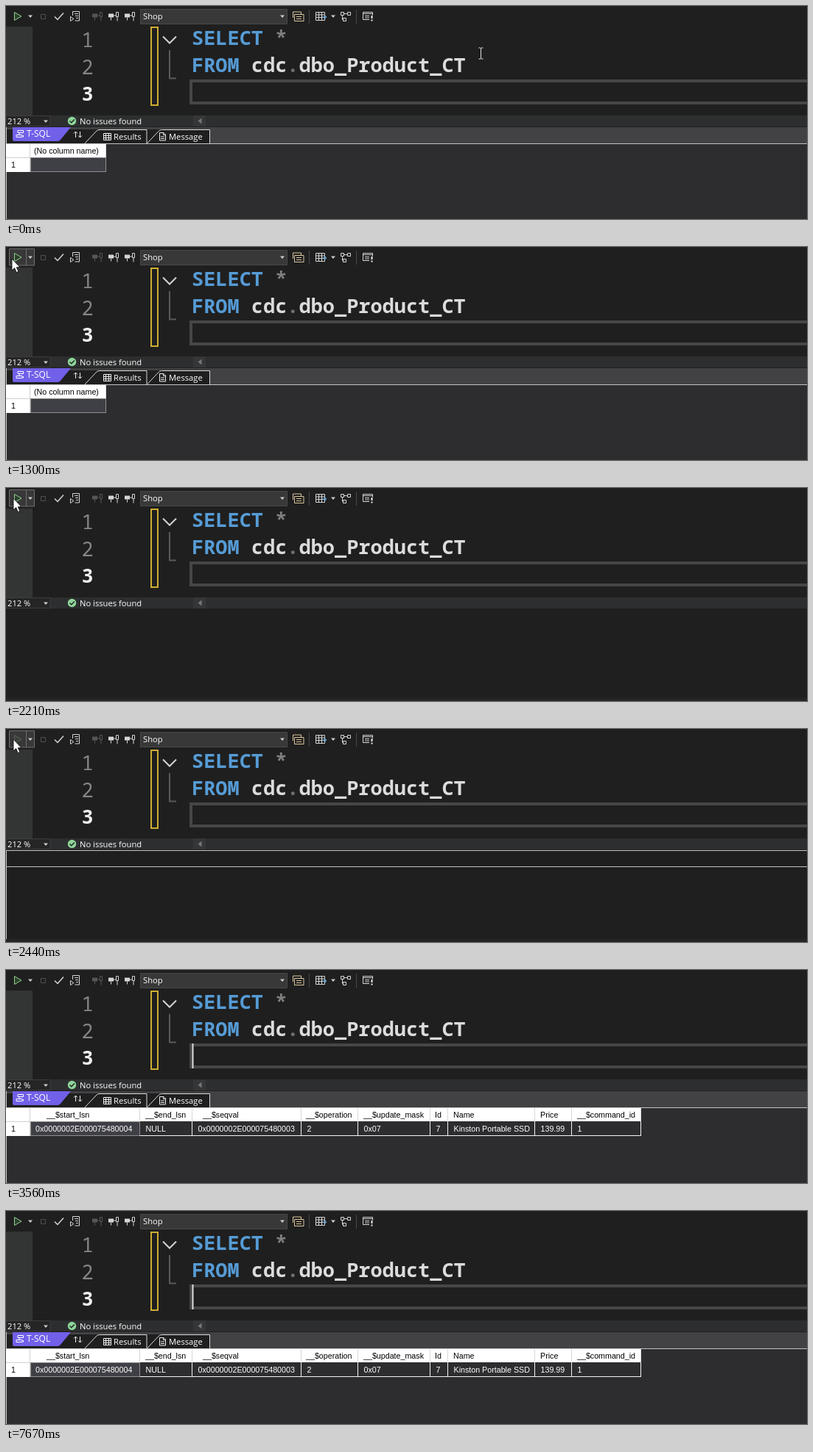
These frames come from a looping animation (1087x290 px, 7940 ms). An HTML page:

```html
<!DOCTYPE html>
<html lang="en">
<head>
<meta charset="utf-8">
<title>Query window</title>
<style>
html, body { margin: 0; width: 100%; height: 100%; overflow: hidden; background: #1f1f1f; }
svg { display: block; width: 1087px; height: 290px; }
text { white-space: pre; }
.code { font: 600 26.95px "Noto Sans Mono", "DejaVu Sans Mono", monospace; fill: #dcdcdc; }
.ui { font: 500 11.2px "Open Sans", "Noto Sans", sans-serif; fill: #fff; }
.cell { font: 10.7px "Liberation Sans", Arial, sans-serif; }
.icon { fill: none; stroke: #d6d6d6; }
</style>
</head>
<body>
<svg viewBox="0 0 1087 290">
  <defs>
    <path id="drop" d="M-3 -1.5h6l-3 3.5z" fill="#d0d0d0"/>
    <g id="plug" class="icon"><path d="M0 10.500h7v5H0z" fill="#d6d6d6" stroke="none"/><path d="M3.500 15.500v4M7 13h3M10.500 8.500h3v6h-3zM12 14.500v6"/></g>
  </defs>
  <rect width="1087" height="290" fill="#1f1f1f"/>

  <!-- toolbar -->
  <g id="hover"><path d="M4.500 2.500h34v22.500h-34z" fill="#383838" stroke="#707070"/><path d="M27.500 3v22" stroke="#707070"/></g>
  <path id="play" d="M11.500 8.500v11l9.500-5.500z" stroke-linejoin="round"/>
  <use href="#drop" x="33" y="14"/>
  <path class="icon" d="M47.500 11.500h6v6h-6z" style="stroke:#505050"/>
  <path class="icon" d="M66 14.500l4 4 8-9" stroke-width="1.500"/>
  <path class="icon" d="M90.500 13v-5.500h9v12.500h-6M93 10.500h5M94 13.500h4M95 16.500h3M87.500 14.500l4.500 3-4.500 3z"/>
  <use href="#plug" x="117" opacity=".3"/>
  <use href="#plug" x="139"/>
  <use href="#plug" x="161"/>
  <path d="M182.500 4.500h199v20h-199z" fill="#383838" stroke="#484848"/>
  <text class="ui" x="186" y="18">Shop</text>
  <use href="#drop" x="375" y="14"/>
  <path class="icon" d="M391.500 11.500h12.500v9h-12.500zM389.500 16v-8h11v3M394 14.500h7M394 17.500h7" style="stroke:#dcc8a0"/>
  <path d="M411.500 5v19M475.500 5v19" stroke="#484848"/>
  <path class="icon" d="M420.500 8.500h12v11h-12zM420.500 12h12M420.500 15.500h12M424.500 8.500v11M428.500 8.500v11"/>
  <path d="M429 15h6M432.500 12.500l2.500 2.500-2.500 2.500" fill="none" stroke="#55a8e8"/>
  <use href="#drop" x="444" y="14"/>
  <path class="icon" d="M454.500 8.500h4v4h-4zM463.500 8.500h4v4h-4zM457.500 16.500h4v4h-4zM459 10.500h4M456.500 13v5.500"/>
  <path class="icon" d="M493 18.500h-8.500v-10h13v4M484.500 10.500h13M487 13.500h6M487 16h6"/>
  <path d="M496.500 13v4M496.500 18.500v2" stroke="#eee" stroke-width="2"/>

  <!-- editor -->
  <path d="M0 28h36v121H0z" fill="#333534"/>
  <g class="code">
    <text x="102.500" y="56" style="fill:#858585;font-weight:500">1</text>
    <text x="102.500" y="93" style="fill:#858585;font-weight:500">2</text>
    <text x="102.500" y="129" style="fill:#f0f0f0">3</text>
    <text x="252" y="53"><tspan fill="#569cd6">SELECT</tspan><tspan fill="#808080"> *</tspan></text>
    <text x="252" y="90"><tspan fill="#569cd6">FROM</tspan> cdc<tspan fill="#707070">.</tspan>dbo_Product_CT</text>
  </g>
  <path d="M197 29h9v106h-9z" fill="none" stroke="#cfae30" stroke-width="2"/>
  <path d="M213 41.500l9 9 9-9" fill="none" stroke="#d4d4d4" stroke-width="2"/>
  <path d="M222 60v38.500h9" fill="none" stroke="#5a5a5a" stroke-width="2"/>
  <path d="M1090 102H251v30h839" fill="none" stroke="#464646" stroke-width="4"/>
  <path id="caret" d="M252.500 100h2v34h-2z" fill="#dcdcdc"/>

  <!-- status strip -->
  <path d="M0 149h1087v15H0z" fill="#2d2e2f"/>
  <path d="M0 149.500h60v14H0z" fill="#252525" stroke="#3d3d3d"/>
  <text class="ui" x="2" y="161">212 %</text>
  <use href="#drop" x="54" y="157"/>
  <circle cx="89.500" cy="156.500" r="5.700" fill="#8ed69a"/>
  <path d="M86.500 156.500l2.300 2.300 4-4.300" fill="none" stroke="#1f1f1f" stroke-width="1.400"/>
  <text class="ui" x="100" y="161">No issues found</text>
  <path d="M254 149h17v15h-17z" fill="#353637"/>
  <path d="M265.500 152.500v8l-5-4z" fill="#777"/>

  <path d="M0 286h1087v4H0z" fill="#252526"/>
  <path id="frame" d="M0 165.500h1087M.5 165v121M0 187.500h1087" stroke="#c4c4c8"/>

  <!-- results panel -->
  <g id="panel">
    <path d="M0 188h1087v102H0z" fill="#2d2d30"/>
    <path d="M0 165h1087v22H0z" fill="#424245"/>
    <path d="M0 168h277v19H0z" fill="#1f1f1f"/>
    <path d="M.5 165v125M0 187.500h1087" stroke="#c4c4c8"/>
    <path d="M9 165h79l-14 17q-1.500 2-4 2H11q-2 0-2-2z" fill="#7160e8"/>
    <path class="icon" d="M16 169.500h7.500v3h-7.500zM14 178.500h8v-3h-8zM18 172.500v3M23.500 176v2.500" style="stroke:#fff"/>
    <text class="ui" x="28" y="178" style="font-size:12px">T-SQL</text>
    <path class="icon" d="M94.500 179v-8M92 173.500l2.500-2.500 2.500 2.500M100.500 171v8M98 176.500l2.500 2.500 2.500-2.500" style="stroke:#eee"/>
    <path d="M107 187l15-16q2-2.500 5-2.500h64V187M191.500 187l15-16q2-2.500 5-2.500h65V187" fill="none" stroke="#d8d8d8"/>
    <path class="icon" d="M132.500 173.500h10v9h-10zM132.500 176.500h10M132.500 179.500h10M135.500 173.500v9M139.500 173.500v9" style="stroke:#eee"/>
    <text class="ui" x="146" y="182">Results</text>
    <path class="icon" d="M208.500 172.500h5.500l2.500 2.500v8h-8zM213.500 172.500v3h3M210 178h5M210 180.500h5" style="stroke:#eee"/>
    <text class="ui" x="221" y="182">Message</text>
    <g id="before"></g>
    <g id="after"></g>
  </g>

  <g id="beam"><path d="M-3 -7.500h2.500l.5.500.5-.5H3M0 -7V7M-3 7.500h2.500l.5-.5.5.5H3" fill="none" stroke="#e0e0e0"/></g>
  <path id="arrow" d="M0 0V16l3.600-3.400 2.600 6 2.700-1.200-2.600-5.700H11z" fill="#fff" stroke="#000" stroke-width=".8"/>
</svg>
<script>
const $ = id => document.getElementById(id);
const LOOP = 7940;

// Each column: left edge, header offset, title, value
function grid(cols, right) {
  const text = (x, y, s, fill) => `<text class="cell" x="${x}" y="${y}" fill="${fill}">${s}</text>`;
  const first = cols.length > 1 ? cols[1][0] : right;
  let out = `<path d="M0 188h${right}v18H0zM0 206h33v20H0z" fill="#fff"/>
    <path d="M0 206.500h33M32.500 188v38" stroke="#d0d0d0"/>` + text(7, 220, "1", "#000");
  cols.forEach(([x, pad, title, value], i) => {
    const end = i + 1 < cols.length ? cols[i + 1][0] : right;
    out += `<path d="M${end - .5} 188v18" stroke="#d8d8d8"/>`;
    if (cols.length > 1) out += `<path d="M${end - .5} 206v20M${x} 225.500H${end}" stroke="#f4f4f4"/>`;
    out += text(x + pad, 201, title, "#000") + text(x + 7.5, 220, value, "#fff");
  });
  const box = `<path d="M33.500 206.500H${first - .5}v19H33.500z"`;
  const cell = box + ' fill="#3f3f46" stroke="#222"/>' + box + ' fill="none" stroke="#fff" stroke-dasharray="1 1"/>';
  return out + cell + text(40, 220, cols[0][3], "#fff");
}

$("before").innerHTML = grid([[33, 5, "(No column name)", ""]], 136);
$("after").innerHTML = grid([
  [33, 22, "__$start_lsn", "0x0000002E000075480004"],
  [182, 7, "__$end_lsn", "NULL"],
  [253, 14, "__$seqval", "0x0000002E000075480003"],
  [401, 6, "__$operation", "2"],
  [478, 7, "__$update_mask", "0x07"],
  [576, 6, "Id", "7"],
  [600, 7, "Name", "Kinston Portable SSD"],
  [718, 7, "Price", "139.99"],
  [768, 7, "__$command_id", "1"]
], 862);

// Pointer stops: time, x, y
const path = [
  [0, 644, 64], [20, 644, 64], [150, 590, 78], [300, 440, 102], [420, 310, 109], [540, 200, 98],
  [680, 95, 68], [800, 52, 47], [900, 36, 36], [1050, 20, 24], [1200, 12, 17], [1300, 8, 16],
  [1360, 1, 16], [1600, 1, 16], [1650, 3, 15], [1790, 3, 15], [1960, 10, 14],
  [3400, 10, 14], [3480, 12, 7], [3560, 17, -22], [LOOP, 17, -22]
];

function pointer(t) {
  const i = path.findIndex(p => p[0] > t);
  const [a, x, y] = path[i - 1], [b, u, v] = path[i];
  const k = (t - a) / (b - a);
  return [Math.round(x + (u - x) * k), Math.round(y + (v - y) * k)];
}

const blinks = [2500, 3020, 3560, 4080, 4580, 5110, 5620, 6130, 6640, 7160, 7670];
const show = (id, on) => $(id).style.display = on ? "" : "none";

function draw(now) {
  const t = now % LOOP;
  const [x, y] = pointer(t);
  const text = x > 207 && y > 28;
  const flip = !text && x > 36 ? -1 : 1;
  show("beam", text);
  show("arrow", !text);
  $("beam").setAttribute("transform", `translate(${x + .5} ${y + .5})`);
  $("arrow").setAttribute("transform", `translate(${x} ${y}) scale(${flip} 1)`);

  const busy = t >= 2230 && t < 2500;
  show("hover", x > 3 && x < 39 && y > 1 && y < 25);
  $("play").setAttribute("fill", busy ? "#3a403a" : "#2c402c");
  $("play").setAttribute("stroke", busy ? "#5c625c" : "#8fd08f");

  show("frame", t >= 2400);
  show("panel", t < 2170 || t >= 2500);
  show("before", t < 2170);
  show("after", t >= 2500);
  show("caret", blinks.filter(b => b <= t).length % 2);
}

const start = performance.now();
function tick() {
  draw(performance.now() - start);
  requestAnimationFrame(tick);
}
tick();
</script>
</body>
</html>
```
